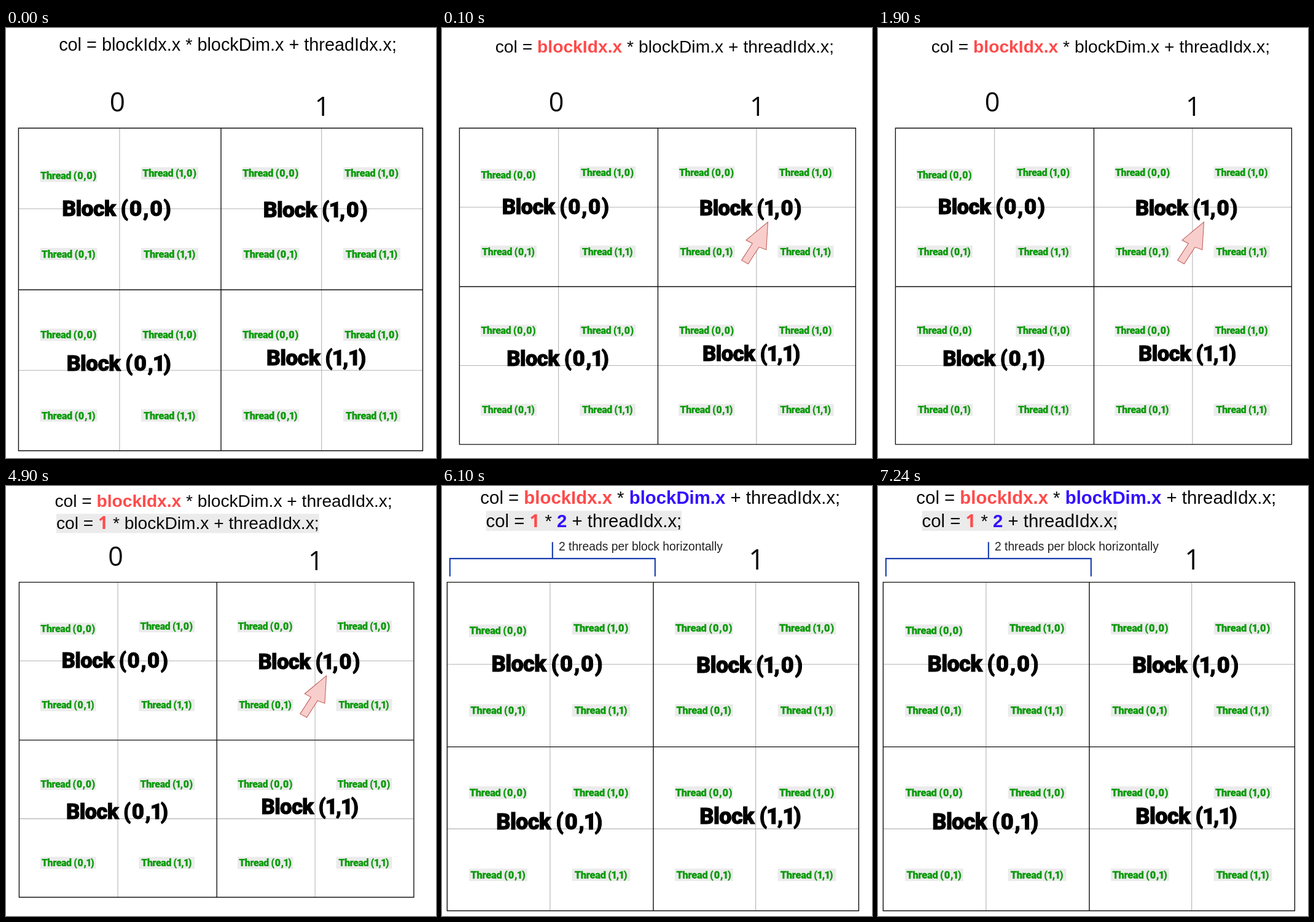
An HTML page for the animation above (8 s loop, 700 by 700 pixels).

```html
<!DOCTYPE html>
<html lang="en">
<head>
<meta charset="utf-8">
<title>CUDA column index</title>
<style>
  html, body { margin: 0; width: 100%; height: 100%; overflow: hidden; background: #fff; }
  svg { display: block; width: 100vw; height: 100vh; }
  text { font-family: "Liberation Sans", Arial, sans-serif; font-size: 28.85px; fill: #080808; white-space: pre; }
  .mid { text-anchor: middle; }
  .axis { font-size: 44px; }
  .digit { font-family: "Open Sans", sans-serif; }
  .note { font-size: 18.95px; fill: #222; }
  .block, .thread { font-family: Roboto, sans-serif; font-weight: 900; text-anchor: middle; letter-spacing: -.02em; }
  .block { font-size: 35.6px; fill: #000; stroke: #000; stroke-width: 1; }
  .thread { font-size: 16.2px; fill: #0a9a0a; stroke: #0a9a0a; stroke-width: .25; }
  .pair { letter-spacing: .045em; }
  .one { letter-spacing: -.09em; }
  .red, .blue { font-weight: bold; }
  .red { fill: #ff4b4b; }
  .blue { fill: #3311ff; }
  .shade { fill: #ebebeb; }
  path { fill: none; }
  .thin { stroke: #b4b4b4; stroke-width: 1.1; }
  .frame { stroke: #111; stroke-width: 1.4; }
  .arrow { fill: #f8cecc; stroke: #c0625c; stroke-width: 1.1; }
  .bracket { stroke: #1a3fb0; stroke-width: 2.1; }
</style>
</head>
<body>
<svg id="stage" viewBox="0 0 700 700"></svg>
<script>
const LOOP = 8000;
const stage = document.getElementById('stage');

const text = (x, y, cls, content) => `<text x="${x}" y="${y}" class="${cls}">${content}</text>`;
const rect = (x, y, w, h) => `<rect x="${x}" y="${y}" width="${w}" height="${h}" class="shade"/>`;
const path = (cls, d) => `<path class="${cls}" d="${d}"/>`;
const mark = (cls, s) => `<tspan class="${cls}">${s}</tspan>`;
// The digit 1 is set narrower than the other digits.
const pair = (a, b) =>
  mark('pair', `(${a},${b})`.replace(/1/g, '<tspan class="one" dx="-.08em">1</tspan>'));

function grid() {
  let out = path('thin', 'M164.5 0V525.3M493.3 0V525.3M0 131.3H658M0 394.3H658') +
    path('frame', 'M0 0H658V525.3H0ZM329.6 0V525.3M0 263.2H658');
  for (let row = 0; row < 4; row++) {
    for (let col = 0; col < 4; col++) {
      const x = 81.6 + 164.5 * col;
      const y = 73.6 + 131.4 * row + (row + col ? 0 : 4);
      out += rect(x - 46.5, y - 10, 93, 20) +
        text(x, y + 5.7, 'thread', 'Thread ' + pair(col % 2, row % 2));
    }
  }
  const blocks = [[160.5, 143, 0, 0], [484.2, 145, 1, 0], [164.2, 395, 0, 1], [485.6, 386.2, 1, 1]];
  for (const [x, y, a, b] of blocks) out += text(x, y, 'block', 'Block ' + pair(a, b));
  return out + text(494.6, -20.3, 'axis digit mid', 1);
}

const formula = (idx, dim) => `col = ${idx} * ${dim} + threadIdx.x;`;
const heading = (idx, dim) => text(340.7, -125.7, 'mid', formula(idx, dim));
const result = (width, dim) => rect(62, -114, width, 32) +
  text(62, -88.4, '', formula(mark('red digit', 1), dim));

const zero = text(161, -27.3, 'axis digit mid', 0);
const arrow = path('arrow', 'M512.2 156L476 186L486.5 191.5L468.5 219.5L479.5 225.5L497.5 197.5L509.5 202Z');
const bracket = path('bracket', 'M4.4 -9.3V-37.8H332.4V-9.3M168.4 -37.8V-64.3') +
  text(178.3, -50.6, 'note', '2 threads per block horizontally');

const redIdx = mark('red', 'blockIdx.x');
const slides = [
  { start: 0, x: 20.4, y: 163, width: 658, art: heading('blockIdx.x', 'blockDim.x') + zero },
  { start: 100, x: 28.4, y: 163, width: 645, art: heading(redIdx, 'blockDim.x') + zero + arrow },
  { start: 3100, x: 21.4, y: 156.6, width: 642.5,
    art: heading(redIdx, 'blockDim.x') + result(438, 'blockDim.x') + zero + arrow },
  { start: 6100, x: 8.4, y: 156.6, width: 670,
    art: heading(redIdx, mark('blue', 'blockDim.x')) + result(313, mark('blue', 2)) + bracket },
];

stage.innerHTML = slides.map(s =>
  `<g transform="translate(${s.x} ${s.y}) scale(${s.width / 658})">${grid()}${s.art}</g>`).join('');
const groups = [...stage.children];

function draw() {
  const t = performance.now() % LOOP;
  const current = slides.findLastIndex(s => s.start <= t);
  groups.forEach((g, i) => g.setAttribute('display', i === current ? 'inline' : 'none'));
  requestAnimationFrame(draw);
}
draw();
</script>
</body>
</html>
```
